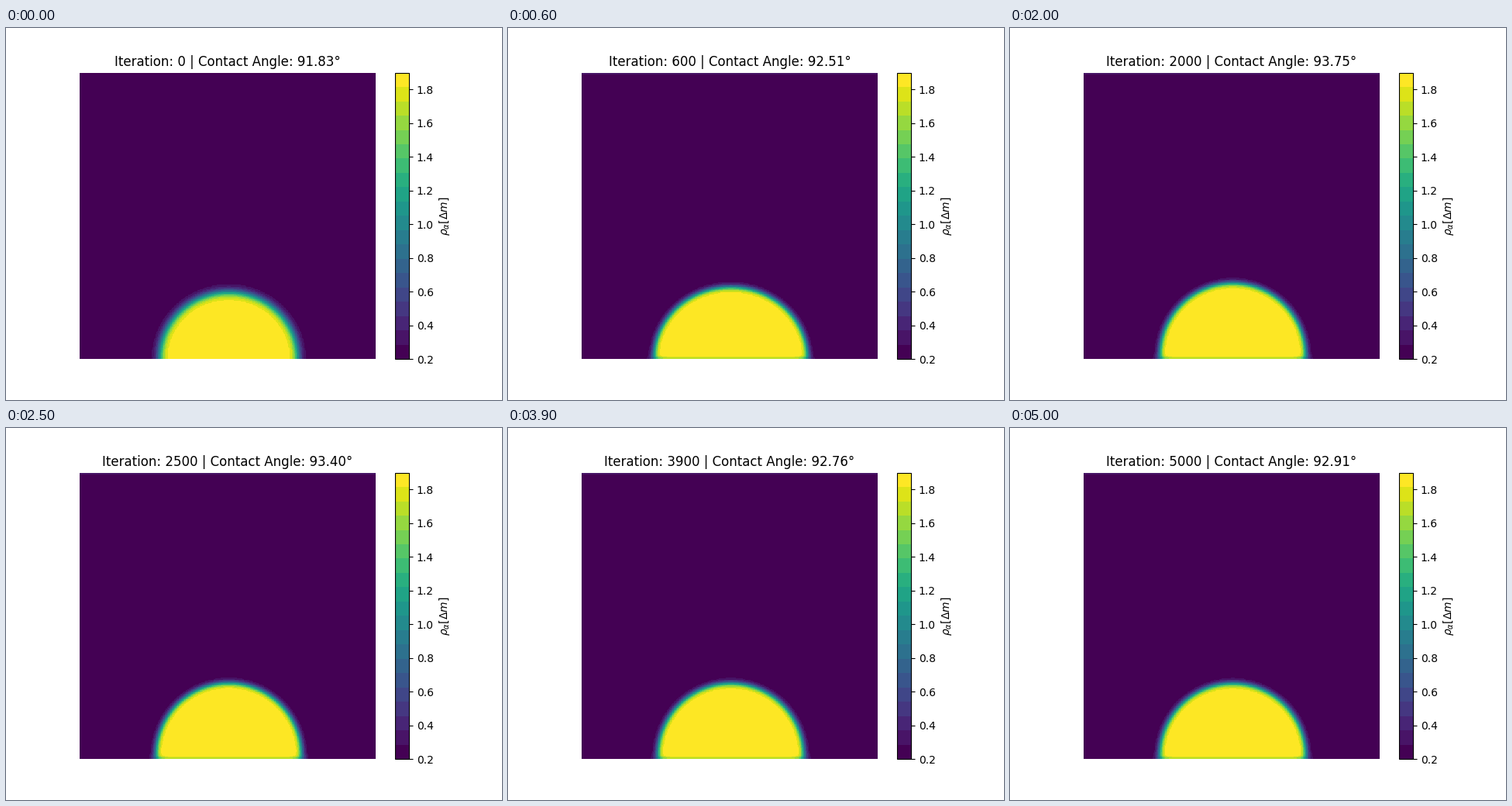
A matplotlib script for the animation above (5100 ms loop, 640 by 480 pixels).

```python
import numpy as np
import matplotlib.pyplot as plt
from matplotlib.animation import FuncAnimation

FRAMES, STEP_MS = 51, 100
NX, NY = 128, 124
RHO_GAS, RHO_LIQ = 0.2, 1.9

# Measured contact angle at a few iterations
ANGLES = {0: 91.83, 600: 92.51, 1200: 90.26, 2000: 93.75,
          3100: 92.97, 3900: 92.76, 5000: 92.91}

x, y = np.meshgrid(np.arange(NX) + 0.5, np.arange(NY) + 0.5)
x -= NX / 2 + 0.5


def contact_angle(step):
    return np.interp(step, list(ANGLES), list(ANGLES.values()))


def density(step):
    """Droplet that grows quickly, then swings from flat to tall and settles."""
    start = np.exp(-step / 120)
    swing = 3.5 * (1 - start) * np.exp(-step / 950) * np.cos(np.pi * step / 3400)
    half_width = 31.7 - 1.8 * start + swing
    height = 32.7 - 3.8 * start - swing

    cy = max(0.0, height - half_width)
    r = np.hypot(x, y - cy)
    q = np.hypot(x / half_width, (y - cy) / (height - cy))
    depth = r * (1 / q - 1)
    thickness = 1.5 + 0.8 * start
    if step > 0:
        thickness = thickness * (1 + 0.5 * np.exp(-y / 1.5))
    rho = RHO_GAS + (RHO_LIQ - RHO_GAS) * (1 + np.tanh(depth / thickness)) / 2
    if step > 0:
        # Rows next to the walls
        rho[0] = RHO_GAS + (rho[0] - RHO_GAS) * 0.87
        rho[-1] = 0.36
    return rho


fig, ax = plt.subplots(figsize=(6.4, 4.8), dpi=100)
ax.axis("off")
field = ax.imshow(density(0), origin="lower", cmap=plt.get_cmap("viridis", 20),
                  vmin=RHO_GAS, vmax=RHO_LIQ)
bar = fig.colorbar(field, ax=ax)
bar.set_label(r"$\rho_{\alpha}[\Delta m]$")
title = ax.set_title("")


def update(frame):
    step = frame * 100
    field.set_data(density(step))
    title.set_text(f"Iteration: {step} | Contact Angle: {contact_angle(step):.2f}°")
    return field, title


anim = FuncAnimation(fig, update, frames=FRAMES, interval=STEP_MS, repeat=True)
plt.show()
```
